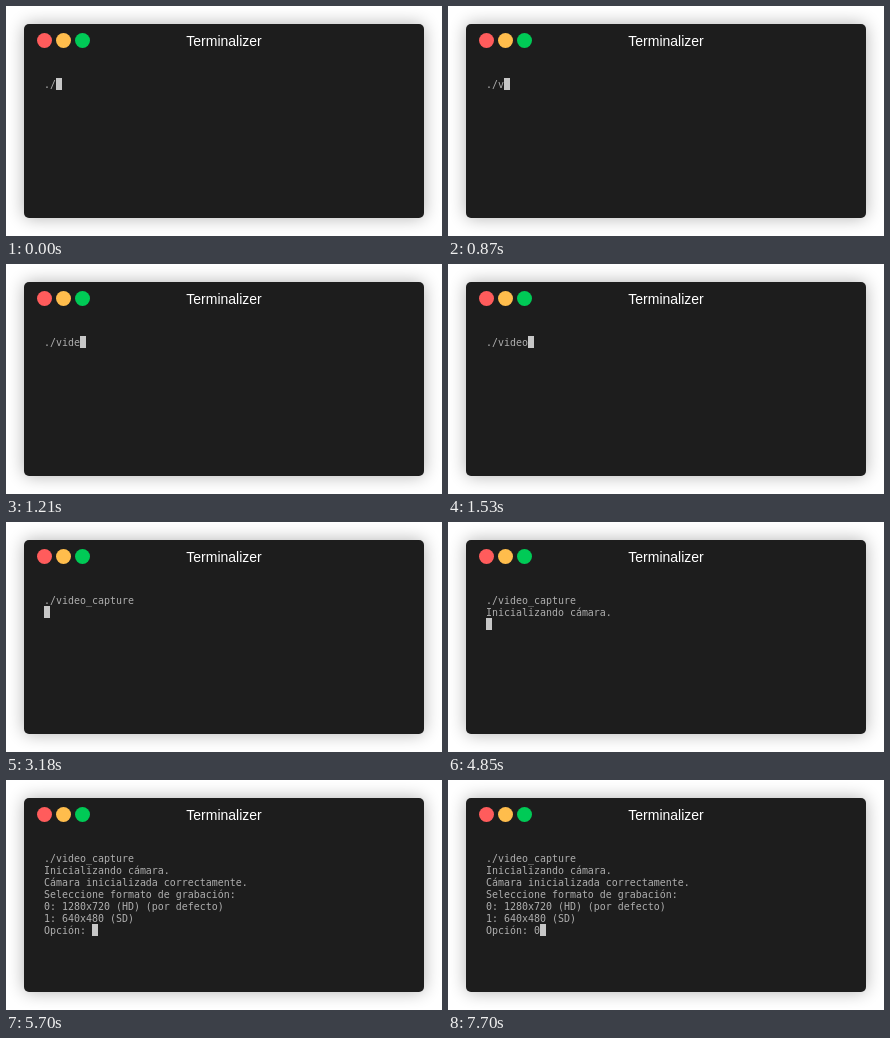
Write an HTML page that moves like this. It is 436x230 px and loops after 8 s.

```html
<!DOCTYPE html>
<html lang="es">
<head>
<meta charset="utf-8">
<title>Terminal</title>
<style>
  html, body { margin: 0; width: 100%; height: 100%; overflow: hidden; background: #fff; }
  svg { display: block; width: 100vw; height: 100vh; }
  .title { font: 14px "Liberation Sans", Arial, sans-serif; fill: #fff; text-anchor: middle; }
  .line { font: 9.967px "DejaVu Sans Mono", monospace; fill: #afafaf; white-space: pre; }
</style>
</head>
<body>
<svg viewBox="0 0 436 230">
  <defs>
    <filter id="blur" x="-20%" y="-20%" width="140%" height="140%">
      <feGaussianBlur stdDeviation="8.5"/>
    </filter>
  </defs>
  <rect x="18" y="18" width="400" height="194" rx="5" fill="#000" opacity=".3" filter="url(#blur)"/>
  <rect x="18" y="18" width="400" height="194" rx="5" fill="#1d1d1d"/>
  <circle cx="38.5" cy="34.5" r="7.5" fill="#ff5c5c"/>
  <circle cx="57.5" cy="34.5" r="7.5" fill="#ffbd4c"/>
  <circle cx="76.5" cy="34.5" r="7.5" fill="#00ca56"/>
  <text class="title" x="218" y="40">Terminalizer</text>
  <g id="lines"></g>
  <rect id="cursor" width="6" height="12" fill="#c7c7c7"/>
</svg>
<script>
const LOOP = 8000, LEFT = 38, TOP = 72, CHAR = 6, ROW = 12, ROWS = 7;

// Each entry: time in ms and the text appended to the screen.
const output = [
  [0, './'],
  [870, 'v'],
  [1070, 'i'],
  [1140, 'd'],
  [1210, 'e'],
  [1530, 'o'],
  [1930, '_capture '],
  [3180, '\n'],
  [4850, 'Inicializando cámara.\n'],
  [5700, 'Cámara inicializada correctamente.\n' +
         'Seleccione formato de grabación:\n' +
         '0: 1280x720 (HD) (por defecto)\n' +
         '1: 640x480 (SD)\n' +
         'Opción: '],
  [7700, '0']
];

const group = document.getElementById('lines');
const cursor = document.getElementById('cursor');
const rows = Array.from({ length: ROWS }, (_, i) => {
  const row = document.createElementNS(group.namespaceURI, 'text');
  row.setAttribute('class', 'line');
  row.setAttribute('x', LEFT);
  row.setAttribute('y', TOP + 10 + i * ROW);
  return group.appendChild(row);
});

let shown = null;

function render(t) {
  const screen = output.filter(([at]) => at <= t).map(([, text]) => text).join('');
  if (screen === shown) return;
  shown = screen;
  const lines = screen.split('\n');
  rows.forEach((row, i) => { row.textContent = lines[i] || ''; });
  const last = lines.length - 1;
  cursor.setAttribute('x', LEFT + lines[last].length * CHAR);
  cursor.setAttribute('y', TOP + last * ROW);
}

const start = performance.now();
function tick() {
  render((performance.now() - start) % LOOP);
  requestAnimationFrame(tick);
}
tick();
</script>
</body>
</html>
```
